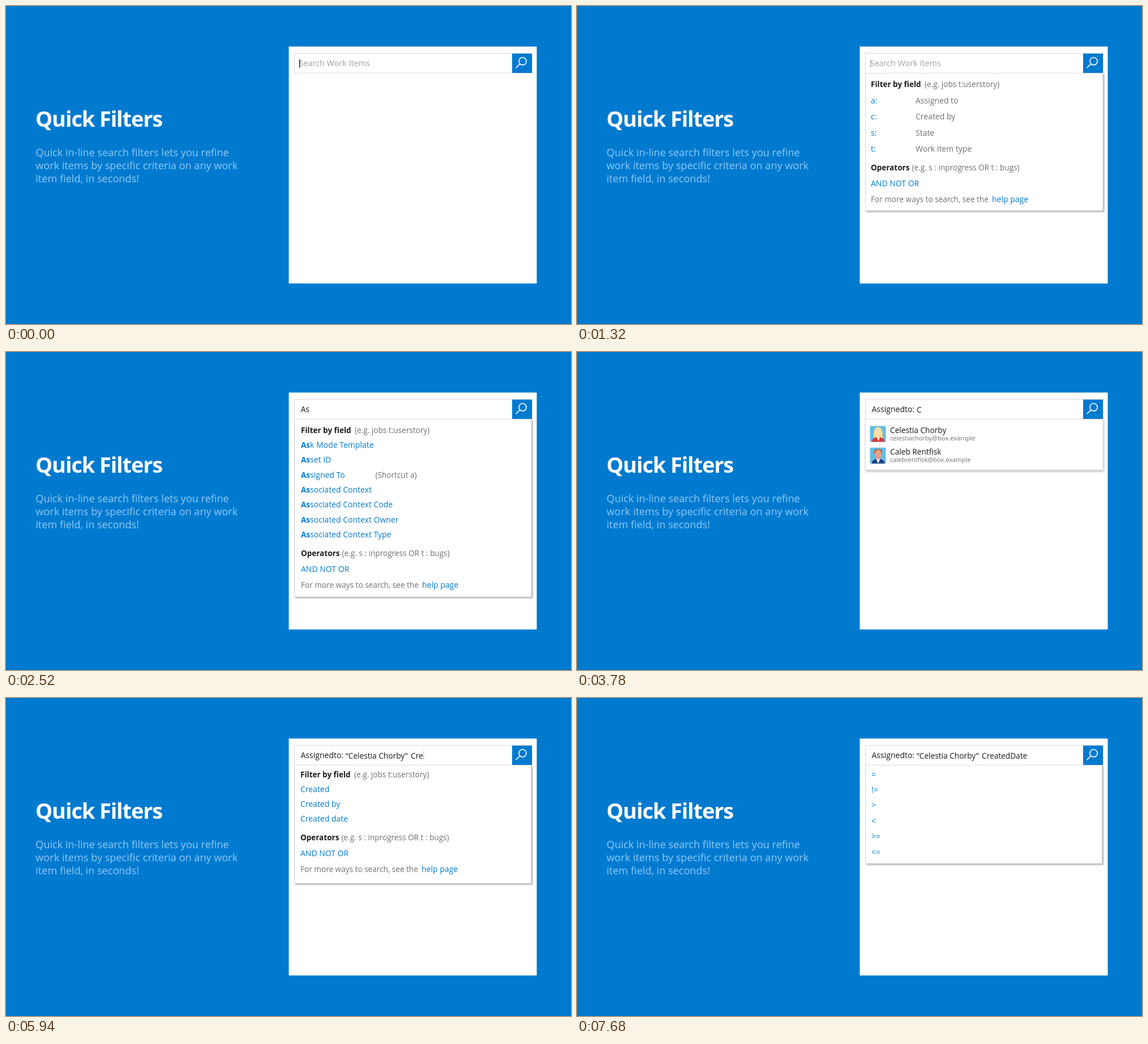
An HTML page that plays this animation: 998x561 px, repeating every 8000 ms.

```html
<!DOCTYPE html>
<html lang="en">
<head>
<meta charset="utf-8">
<title>Quick Filters</title>
<style>
  html, body { margin: 0; width: 100%; height: 100%; overflow: hidden; background: #007acf; }
  svg { display: block; width: 100vw; height: 100vh; }
  text { font-family: 'Open Sans', 'Noto Sans', sans-serif; font-size: 14px; white-space: pre; }
  .title { font-size: 38px; font-weight: 700; letter-spacing: -.03em; }
  .intro { font-size: 18.1px; }
  .hint { font-size: 14.4px; }
  .strong { font-size: 13.5px; font-weight: 700; }
  .note { font-size: 13.6px; }
  .typed { font-size: 13.7px; }
  .mail { font-size: 11.1px; }
  .panel > rect { fill: #fff; stroke: #d6d6d6; filter: drop-shadow(2px 2px 1px rgba(0, 0, 0, .3)); }
  .soft > rect { stroke: #e6e6e6; filter: drop-shadow(1px 2px 2px rgba(0, 0, 0, .3)); }
</style>
</head>
<body>
<svg id="stage" viewBox="0 0 998 561"></svg>
<script>
const LOOP = 8000;
const BLUE = '#007acf', INK = '#1a1a1a', GREY = '#707070', PALE = '#8fcbf6';
const stage = document.getElementById('stage');

function add(parent, tag, attrs = {}, content) {
  const el = document.createElementNS('http://www.w3.org/2000/svg', tag);
  for (const key in attrs) el.setAttribute(key, attrs[key]);
  if (content !== undefined) el.textContent = content;
  return parent.appendChild(el);
}
const label = (parent, x, y, content, fill, look = '') =>
  add(parent, 'text', { x, y, fill, class: look }, content);
const box = (parent, x, y, width, height, fill, attrs = {}) =>
  add(parent, 'rect', { x, y, width, height, fill, ...attrs });

// Fixed scenery
box(stage, 0, 0, 998, 561, BLUE);
label(stage, 52, 212.5, 'Quick Filters', '#fff', 'title');
['Quick in-line search filters lets you refine',
 'work items by specific criteria on any work',
 'item field, in seconds!'].forEach((line, i) =>
  label(stage, 52.3, 265 + 23 * i, line, PALE, 'intro'));
box(stage, 499.5, 71.5, 438, 418, '#fff');

const panels = add(stage, 'g');

// Search box
box(stage, 509.5, 83.5, 420, 35, '#fff', { stroke: '#d9d9d9' });
box(stage, 894, 84, 35, 34, BLUE);
add(stage, 'path', {
  d: 'M907.9 102.1 L900.6 109.3 M906 97.4 a6.6 6.6 0 1 0 13.2 0 a6.6 6.6 0 1 0 -13.2 0',
  fill: 'none', stroke: '#fff', 'stroke-width': 1.6
});
const placeholder = label(stage, 517.5, 106, 'Search Work Items', '#a2a2a2', 'hint');
const fieldText = label(stage, 520.5, 106, '', INK);
const valueText = label(stage, 600, 107, '', INK, 'typed');
const nextText = label(stage, 715, 107, '', INK, 'typed');
const cursor = box(stage, 518, 94, 1.2, 15, '#000');

// Drop-down panels
const timeline = [];
function panel(from, to, right, bottom, fade = {}, look = 'panel') {
  const el = add(panels, 'g', { class: look });
  box(el, 509.5, 118.5, right - 509.5, bottom - 118.5, '#fff');
  timeline.push({ el, from, to, ...fade });
  return el;
}
function header(g, x, y) {
  label(g, x, y, 'Filter by field', INK, 'strong');
  label(g, x + 95, y, '(e.g. jobs t:userstory)', GREY, 'note');
}
function footer(g, x, y) {
  label(g, x, y, 'Operators', INK, 'strong');
  label(g, x + 72.5, y, '(e.g. s : inprogress OR t : bugs)', GREY, 'note');
  label(g, x, y + 27.5, 'AND NOT OR', BLUE);
  label(g, x, y + 55.5, 'For more ways to search, see the', GREY, 'note');
  label(g, x + 214, y + 55.5, 'help page', BLUE);
}
function shortcutPanel(from, to, shift, x, fade) {
  const g = panel(from, to, 929, 361 + shift, fade);
  header(g, x, 143 + shift);
  [['a:', 'Assigned to'], ['c:', 'Created by'], ['s:', 'State'], ['t:', 'Work item type']].forEach(([key, name], i) => {
    const y = 171.5 + shift + 28.5 * i;
    label(g, x, y, key, BLUE);
    label(g, x + 79, y, name, GREY);
  });
  footer(g, x, 290 + shift);
}
function fieldPanel(from, to, x, top, right, bottom, match, names, fade) {
  const g = panel(from, to, right, bottom, fade);
  header(g, x, top);
  names.forEach((name, i) => {
    const y = top + 26 + 26.3 * i;
    const row = label(g, x, y, '', BLUE);
    add(row, 'tspan', { class: 'strong' }, name.slice(0, match));
    add(row, 'tspan', {}, name.slice(match));
    if (name === 'Assigned To') label(g, x + 131.5, y, '(Shortcut a)', GREY, 'note');
  });
  footer(g, x, top + 59.3 + 26.3 * (names.length - 1));
}
function avatar(g, x, y, hair, skin, coat, longHair) {
  const a = add(g, 'g', { transform: `translate(${x} ${y})` });
  const shape = (d, fill) => add(a, 'path', { d, fill });
  box(a, 0, 0, 28, 28, '#62bde9');
  if (longHair) shape('M7 26 Q4 3 14 2 Q25 2 22 26 Z', hair);
  shape('M3 28 Q4 21 11 20 H18 Q25 21 26 28 Z', coat);
  shape(longHair ? 'M11 19 H18 L15 27 Z' : 'M11 20 H18 L14.5 28 Z', longHair ? skin : '#fff');
  if (!longHair) shape('M7 11 Q7 4 10 3 H19 Q22 4 21 11 Z', hair);
  shape('M9 10 Q9 4 14.5 4 Q20 4 20 10 Q20 20 14.5 21 Q9 20 9 10 Z', skin);
}
function peoplePanel(from, to, people, bottom) {
  const g = panel(from, to, 929, bottom, {}, 'panel soft');
  people.forEach(([name, hair, skin, coat, longHair], i) => {
    const y = 38.2 * i;
    avatar(g, 517.5, 130.5 + y, hair, skin, coat, longHair);
    label(g, 553, 142.5 + y, name, INK, 'typed');
    label(g, 553, 156 + y, name.toLowerCase().replace(' ', '') + '@box.example', GREY, 'mail');
  });
}

const asFields = ['Ask Mode Template', 'Asset ID', 'Assigned To', 'Associated Context',
  'Associated Context Code', 'Associated Context Owner', 'Associated Context Type'];
const people = [
  ['Celestia Chorby', '#f2e17c', '#f8dfb0', '#d9363e', true],
  ['Caleb Rentfisk', '#b9562f', '#e5a184', '#1d3f86', false],
  ['Delia Farnbeck', '#6b4129', '#f0c49c', '#3c8a5b', true],
  ['Edwin Harlstow', '#3a3030', '#d9a37c', '#4a4a55', false],
  ['Jorun Millbrake', '#b9562f', '#f8dfb0', '#7b4aa0', true],
  ['Perrin Oskwell', '#d8b25a', '#e5b494', '#1d3f86', false]
];
shortcutPanel(420, 1500, 0, 519, { fadeIn: 240 });
fieldPanel(1500, 1740, 521, 143, 928, 460, 1, ['Activated By', 'Activated Date', 'Area ID', ...asFields.slice(0, 5)]);
fieldPanel(1740, 2580, 521, 143, 928, 432, 2, asFields);
peoplePanel(2580, 3780, people, 357.5);
peoplePanel(3780, 4920, people.slice(0, 2), 208);
shortcutPanel(4920, 5820, -3, 520);
fieldPanel(5820, 7380, 520, 139.5, 927.5, 327, 0, ['Created', 'Created by', 'Created date'], { fadeOut: 180 });
const operators = panel(7380, LOOP, 927.5, 292, { fadeIn: 300 });
['=', '!=', '>', '<', '>=', '<='].forEach((sign, i) =>
  label(operators, 520, 139.5 + 27.4 * i, sign, BLUE));

const touch = add(stage, 'circle', { fill: BLUE });

// Steps are [time, value]; the latest one reached applies.
const fieldSteps = [[0, ''], [1500, 'A'], [1620, 'As'], [2580, 'Assignedto:']];
const valueSteps = [[0, ''], [3780, 'C'], [4920, '“Celestia Chorby”']];
const nextSteps = [[0, ''], [5760, 'C'], [5820, 'Cr'], [5880, 'Cre'], [7440, 'CreatedDate']];
const cursorSteps = [[0, 518], [4920, 714], [5760, 725], [5820, 730], [5880, 737]];
const touches = [[2040, 540, 560, 212], [4380, 420, 651.5, 144], [6900, 480, 571.5, 217]];

const at = (steps, t) => steps.filter(step => step[0] <= t).pop()[1];
const clamp = v => Math.max(0, Math.min(1, v));
const pulse = ms => .5 + .5 * Math.cos(ms / 1000 * 2 * Math.PI);

function render(t) {
  for (const { el, from, to, fadeIn, fadeOut } of timeline) {
    const shown = t >= from && t < to;
    const rise = fadeIn ? clamp((t - from) / fadeIn) : 1;
    const fall = fadeOut ? clamp((to - t) / fadeOut) : 1;
    el.setAttribute('visibility', shown ? 'visible' : 'hidden');
    el.setAttribute('opacity', Math.min(rise, fall));
  }
  placeholder.setAttribute('visibility', t < 1500 ? 'visible' : 'hidden');
  fieldText.textContent = at(fieldSteps, t);
  valueText.textContent = at(valueSteps, t);
  nextText.textContent = at(nextSteps, t);

  const blink = t < 1500 ? pulse(t) : t >= 4920 && t < 6540 ? pulse(t - 4620) : 0;
  cursor.setAttribute('x', at(cursorSteps, t));
  cursor.setAttribute('opacity', blink);

  touch.setAttribute('opacity', 0);
  for (const [start, length, cx, cy] of touches) {
    const p = (t - start + 60) / length;
    if (t < start || p >= 1) continue;
    touch.setAttribute('cx', cx);
    touch.setAttribute('cy', cy);
    touch.setAttribute('r', 30 * (1 - (1 - clamp(p / .84)) ** 2));
    touch.setAttribute('opacity', .35 * Math.min(1, p * 4, (1 - p) * 4));
  }
}

const startTime = performance.now();
function tick() {
  render((performance.now() - startTime) % LOOP);
  requestAnimationFrame(tick);
}
tick();
</script>
</body>
</html>
```
